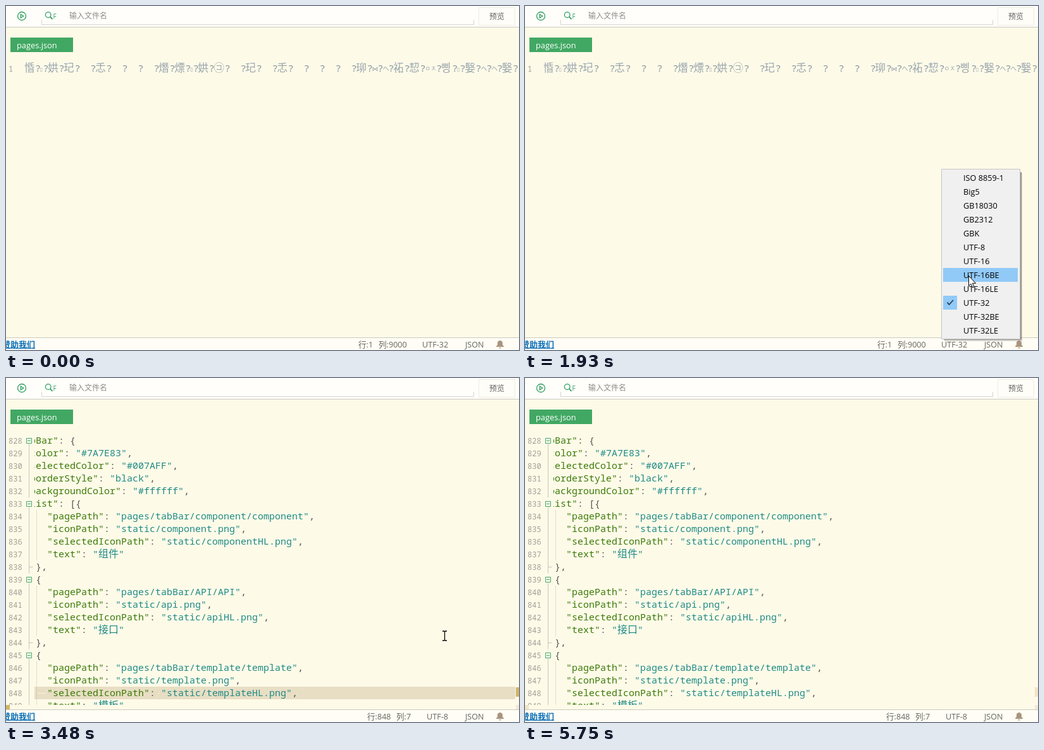
Animation, 811 px wide and 545 px high, one loop 5900 ms. Source, as an HTML page:

```html
<!DOCTYPE html>
<html lang="zh-CN">
<head>
<meta charset="utf-8">
<title>pages.json</title>
<style>
html, body { margin: 0; width: 100%; height: 100%; overflow: hidden; background: #fefae8; }
svg { display: block; }
text { font: 12.6px "Open Sans", "Noto Sans CJK SC", sans-serif; white-space: pre; }
.small { font-size: 12px; }
.status text { fill: #66665f; }
.num { font: 12px "Noto Sans Mono", monospace; fill: #a0a097; }
.code { font: 15px "Noto Sans Mono", "Noto Sans CJK SC", monospace; fill: #555; }
.key { fill: #3c7b08; }
.str { fill: #1f8b86; }
.odd { font: 300 16.5px "Noto Sans CJK SC", "DejaVu Sans", sans-serif; fill: #98a5ad; }
.odd.q { font: 15px "Noto Sans Mono", monospace; fill: #85939c; }
.odd.tiny { font: 8px "DejaVu Sans", sans-serif; }
.odd.mid { font-size: 10px; }
.menu { font-size: 12.7px; }
.link { font-size: 13px; font-weight: bold; text-decoration: underline; fill: #0a6fb8; }
</style>
</head>
<body>
<svg width="811" height="545" viewBox="0 0 811 545">
  <clipPath id="oddClip"><path d="M30 80H811V120H30z"/></clipPath>
  <clipPath id="codeClip"><path d="M45 80H805V518H45z"/></clipPath>
  <clipPath id="gutterClip"><path d="M0 80H811V518H0z"/></clipPath>

  <path fill="#fefae8" d="M0 0H811V545H0z"/>
  <path fill="#fffefb" d="M0 0H811V33H0z"/>
  <path fill="#fffdf5" d="M0 526H811V545H0z"/>
  <path fill="#cbc9c0" d="M0 33H811V34H0zM0 525H811V526H0z"/>
  <g fill="none" stroke="#2f9e5f" stroke-width="1.3">
    <circle cx="25" cy="16" r="6.5"/>
    <path d="M23.3 13.2V18.8L27.7 16z"/>
    <circle cx="66.7" cy="14" r="4.3"/>
    <path d="M69.8 17.1L73.5 20.8" stroke-width="1.8"/>
  </g>
  <text x="74.5" y="20" fill="#2f9e5f" style="font-size:10px">F</text>
  <path d="M56.5 22V29.5H739.5V22" fill="none" stroke="#d6d4cd"/>
  <text class="small" x="100" y="20" fill="#8d8d88">输入文件名</text>
  <path d="M747.5 2.5H804.5V30.5H747.5z" fill="#fffdf7" stroke="#eeebe0"/>
  <text class="small" x="764" y="20.5" fill="#666">预览</text>
  <path fill="#41a863" d="M7 50H106V73H7z"/>
  <text x="17" y="67" fill="#fff" style="font-size:12.8px">pages.json</text>

  <g id="garbled">
    <path id="picked" fill="#e9dfc4" d="M31 89H811V109H31z"/>
    <text class="num" x="4" y="104">1</text>
    <g id="oddText" clip-path="url(#oddClip)"></g>
    <path id="endCaret" d="M809 89H811V109H809z"/>
    <g class="status">
      <text x="557" y="541">行:1</text><text x="589" y="541">列:9000</text><text x="658" y="541">UTF-32</text>
    </g>
  </g>

  <g id="decoded">
    <g id="current">
      <path fill="#e8dec4" d="M45 489H805V509H45z"/>
      <path d="M50 499.5H63M241 499.5H243" stroke="#f8f2e0"/>
    </g>
    <g id="gutter" clip-path="url(#gutterClip)"></g>
    <g id="lines" clip-path="url(#codeClip)"></g>
    <path id="caret" d="M46 489H48V509H46z"/>
    <path fill="#f2e9d6" d="M806 518H811V525H806z"/>
    <path fill="#f3e4c6" d="M806 490H811V505H806zM0 518H6V525H0z"/>
    <path id="bars" fill="#d2b568" d="M806 490H811V505H806zM0 518H6V525H0z"/>
    <g class="status">
      <text x="571" y="541">行:848</text><text x="617" y="541">列:7</text><text x="665" y="541">UTF-8</text>
    </g>
  </g>

  <g class="status"><text x="726" y="541">JSON</text></g>
  <text class="link" x="-6" y="540.5">赞助我们</text>
  <path fill="#a9957f" d="M775 540V539L777 537V534Q777 531 780 530.3Q781 529 782 530.3Q785 531 785 534V537L787 539V540zM779 541H783Q781 544 779 541z"/>

  <g id="menu">
    <path fill="#000" opacity=".16" d="M663 264H786V531H663z"/>
    <path fill="#000" opacity=".28" d="M662 263H785V529H662z"/>
    <path fill="#f0f0f0" stroke="#c4c4c4" d="M658.5 258.5H782.5V527.5H658.5z"/>
    <rect id="hover" x="661" width="118" height="22" fill="#91c9f7"/>
    <path fill="#91c9f7" d="M661 459H683V481H661z"/>
    <path d="M667.5 469.5L670.5 473L677 466" fill="none" stroke="#1d3850" stroke-width="1.6"/>
  </g>

  <circle id="click" r="12" fill="#ffee00" opacity=".6"/>
  <path id="arrow" fill="#fff" stroke="#000" d="M.5 .5V16.5L4 13.2L6.6 19L9 18L6.5 12.3H11.5z"/>
  <path id="beam" fill="none" stroke="#000" stroke-width="1.3" d="M-3.5 -7.5H-1L0 -6.5L1 -7.5H3.5M0 -6.5V6.5M-3.5 7.5H-1L0 6.5L1 7.5H3.5"/>
</svg>
<script>
const LOOP = 5900, DECODE = 2700, ROW = 20;
const $ = id => document.getElementById(id);
const add = (parent, html) => parent.insertAdjacentHTML('beforeend', html);
const show = (id, on) => $(id).style.display = on ? '' : 'none';
const within = (t, a, b) => t >= a && t < b;

// Wrongly decoded line: each kind of glyph has its own advance
const odd = '惛?▯?娂?玘? ?忎? ? ? ?熸?熛?▯?娂?㋙? ?玘? ?忎? ? ? ? ?珋?⋈?ヘ?祏?恝?ㅇㅈ?삥?▯?嫛?ヘ?ヘ?嫛?';
const kinds = {'?': ['q', 7.8], '▯': ['tiny', 4.6]};
for (const ch of '⋈ヘㅇㅈ') kinds[ch] = ['mid', 9];
let penX = 28.8;
for (const ch of odd) {
  const [kind, advance] = kinds[ch] || ['', 17.2];
  const y = kind === 'tiny' || kind === 'mid' ? 102.5 : 104;
  add($('oddText'), `<text class="odd ${kind}" x="${penX}" y="${y}">${ch}</text>`);
  penX += advance;
}

const page = (path, icon, label) => [
  [65, `"pagePath": "pages/tabBar/${path}/${path}",`],
  [65, `"iconPath": "static/${icon}.png",`],
  [65, `"selectedIconPath": "static/${icon}HL.png",`],
  [65, `"text": "${label}"`]];
const lines = [
  [11, '"tabBar": {'],
  [29, '"color": "#7A7E83",'],
  [29, '"selectedColor": "#007AFF",'],
  [29, '"borderStyle": "black",'],
  [29, '"backgroundColor": "#ffffff",'],
  [29, '"list": [{'],
  ...page('component', 'component', '组件'), [47, '},'], [47, '{'],
  ...page('API', 'api', '接口'), [47, '},'], [47, '{'],
  ...page('template', 'template', '模板')];

const paint = s => s
  .replace(/"[^"]*"(:?)/g, (m, colon) => colon
    ? `<tspan class=key>${m.slice(0, -1)}</tspan>:`
    : `<tspan class=str>${m}</tspan>`)
  .replace(/[一-龥]+/g, '<tspan style=font-size:16px>$&</tspan>');

const stroke = (d, color, extra = '') =>
  add($('gutter'), `<path d="${d}" fill="none" stroke="${color}" ${extra}/>`);
lines.forEach(([x, s], i) => {
  const mid = 99.5 + ROW * i, top = mid - 10, bottom = mid + 10;
  add($('gutter'), `<text class="num" x="4" y="${mid + 4.5}">${828 + i}</text>`);
  add($('lines'), `<text class="code" x="${x}" y="${mid + 4.5}">${paint(s)}</text>`);
  if (s.endsWith('{')) {
    stroke(`M36.5 ${mid + 5}V${bottom}`, '#c6c5b4');
    stroke(`M32.5 ${mid - 4}h8v8h-8zM34 ${mid}h5`, '#45a96d');
  } else {
    stroke(`M36.5 ${top}V${bottom}` + (s === '},' ? `M36.5 ${mid}h6` : ''), '#c6c5b4');
  }
  if (x === 65) stroke(`M48.5 ${top}V${bottom}`, '#bfc0b0', 'stroke-dasharray="1 1"');
});

['ISO 8859-1', 'Big5', 'GB18030', 'GB2312', 'GBK', 'UTF-8', 'UTF-16', 'UTF-16BE', 'UTF-16LE',
  'UTF-32', 'UTF-32BE', 'UTF-32LE'].forEach((name, i) =>
  add($('menu'), `<text class="menu" x="693" y="${277 + 22 * i}">${name}</text>`));

// Pointer moves: first step, last step, number of steps, end x, end y
const moves = [
  [290, 290, 1, 683, 543], [530, 700, 3, 679, 537],
  [1540, 1540, 1, 694, 485], [1625, 1710, 2, 701, 440],
  [1930, 2160, 4, 702, 389], [2240, 2240, 1, 702, 384],
  [2700, 2700, 1, 705, 385], [3170, 3730, 8, 682, 433],
  [3800, 3800, 1, 649, 433], [3950, 4180, 4, 628, 433],
  [4280, 4500, 4, 600, 444], [4650, 4890, 4, -10, 480]];

function pointer(t) {
  let x = 683, y = 560;
  for (const [from, to, n, endX, endY] of moves) {
    if (t < from) break;
    const step = n > 1 ? (to - from) / (n - 1) : 1;
    const k = Math.min(n, Math.floor((t - from) / step + 1.001)) / n;
    x += (endX - x) * k;
    y += (endY - y) * k;
  }
  return [Math.round(x), Math.round(y)];
}

// Scrollbar strength, in 80 ms steps
function barLevel(t) {
  const step = from => Math.max(0, Math.min(1, Math.floor((t - from) / 80) / 4));
  return step(2700) - step(4890);
}

function draw(t) {
  const decoded = t >= DECODE, [x, y] = pointer(t);
  show('garbled', !decoded);
  show('decoded', decoded);
  show('picked', within(t, 910, 1070));
  show('endCaret', within(t, 910, 1070));
  show('current', t < 5750);
  show('caret', t < 5750 && Math.floor((t - 2670) / 500) % 2 === 0);
  $('bars').style.opacity = barLevel(t);

  show('menu', within(t, 1130, 2640));
  $('menu').style.opacity = t < 1220 ? .5 : 1;
  const row = Math.floor((y - 261) / 22);
  show('hover', row < 12);
  $('hover').setAttribute('y', 261 + 22 * row);

  show('click', within(t, 870, 1070) || within(t, 2470, 2640));
  show('arrow', !decoded);
  show('beam', decoded && t < 4890);
  for (const id of ['click', 'arrow']) $(id).setAttribute('transform', `translate(${x} ${y})`);
  $('beam').setAttribute('transform', `translate(${x - .5} ${y - .5})`);
}

function tick() {
  draw(performance.now() % LOOP);
  requestAnimationFrame(tick);
}
tick();
</script>
</body>
</html>
```
